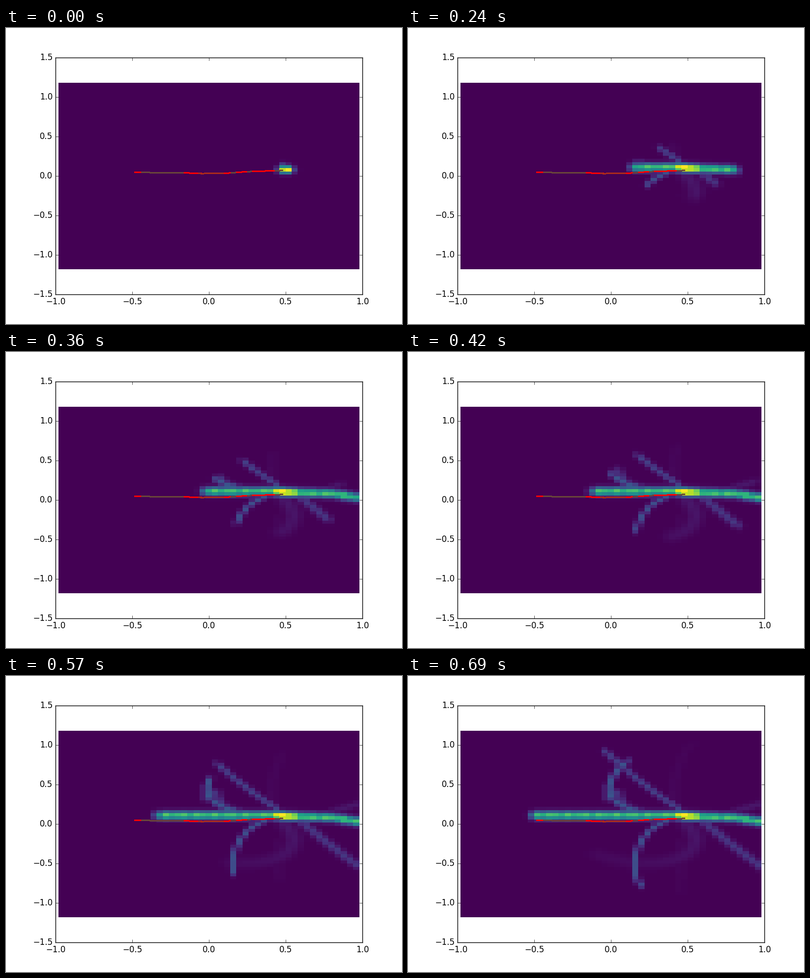
A matplotlib script for the animation above (720 ms loop, 800 px wide and 600 px high).

```python
from math import comb

import numpy as np
import matplotlib.pyplot as plt
from matplotlib.animation import FuncAnimation

plt.style.use("classic")
plt.rcParams["font.family"] = "DejaVu Sans"

FRAMES, INTERVAL = 24, 30
CELL = 0.04
PIXEL_X, PIXEL_Y = 2 / 620, 3 / 480
COLS = np.arange(-24, 25)
ROWS = np.arange(-29, 30)
NN, MM = np.meshgrid(COLS, ROWS)


def smooth(x):
    x = np.clip(x, 0, 1)
    return x * x * (3 - 2 * x)


def bell(d, width):
    return np.exp(-(d / width) ** 2)


# horizontal beam: a ridge that bends down on the right, with slight beats
RIDGE = np.interp(NN, [10, 13, 20, 24], [2.8, 2.5, 2.1, 0.9])
LEVEL = (0.7 + 0.45 * bell(NN - 12.3, 1.8)
         + 0.06 * np.cos(2 * np.pi * (NN + 12.2) / 2.625))
BEAM = LEVEL * bell(MM - RIDGE, 1.27)
BEAM_START = np.where(NN <= 12, (11 - NN) / 1.087, NN - 13.6)

# compact emission spot that fades while the beam builds up
SPOT = 1.18 * bell(NN - 12.55, 1.08) * bell(MM - 2.05, 1.1)


def bezier(points, u):
    k = len(points) - 1
    weights = [comb(k, j) * u ** j * (1 - u) ** (k - j) for j in range(k + 1)]
    return np.array(points, float).T @ np.array(weights)


def stroke(value, width, start, end, points, fade=0.0):
    """Cell weights along a curve, and the frame at which each part appears."""
    u = np.linspace(0, 1, 90)
    n, m = bezier(points, u)[:, :, None, None]
    level = value * (1 - fade * u)[:, None, None]
    kernel = level * bell(NN - n, width) * bell(MM - m, 1.2 * width + 0.25)
    return kernel, start + (end - start) * u


STROKES = [
    # diagonal towards the upper left
    stroke(0.19, 0.55, 2.5, 22.6, [(11, 5), (5, 12.4), (-1, 23.3)]),
    # hook above the beam, with its blur
    stroke(0.26, 0.55, 8, 23, [(4, 4.5), (-1.1, 6.8), (-1.8, 12.9), (3, 20.5)]),
    stroke(0.16, 0.70, 7, 14, [(5, 4), (1.5, 5), (1.2, 10)]),
    stroke(0.07, 0.50, 15, 18, [(-1, 8), (-1, 12)]),
    # hook below the beam
    stroke(0.24, 0.50, 2.5, 22.7, [(9, 1), (4.2, -2.1), (2.6, -14.1), (5, -19.6)]),
    # curve towards the lower right
    stroke(0.16, 0.75, 4, 19, [(15, 1), (19, -5.7), (24.5, -13.5)]),
    # faint wide swirls
    stroke(0.06, 1.40, 3, 23, [(12.5, 0), (17.5, -10.1), (6.9, -16.6), (-3, -9)],
           fade=0.65),
    stroke(0.02, 0.90, 4, 23, [(10.5, 5), (9.5, 18), (13.5, 26)], fade=0.5),
    stroke(0.02, 0.90, 8, 23, [(11.5, -6), (11.3, -22)], fade=0.5),
    # small branch at the right edge
    stroke(0.06, 0.70, 10, 14, [(20, 4), (24, 6.2)]),
]


def density(i):
    heat = np.maximum(BEAM * smooth((i - BEAM_START + 0.2) / 2.4),
                      SPOT * max(0, 1 - i / 4))
    for kernel, t in STROKES:
        seen = smooth((i - t + 0.6) / 1.5)
        heat = np.maximum(heat, (kernel * seen[:, None, None]).max(axis=0))
    return heat


def edges(cells, shift):
    """Cell borders moved by a fraction of a pixel; the outer end stays put."""
    e = (np.append(cells, cells[-1] + 1) - 0.5) * CELL
    e[:-1] -= shift
    return e


fig = plt.figure(figsize=(8, 6), dpi=100, facecolor="white")
ax = fig.add_axes([0.125, 0.1, 0.775, 0.8])
mesh = ax.pcolormesh(edges(COLS, 0.35 * PIXEL_X), edges(ROWS, 0.35 * PIXEL_Y),
                     density(0), cmap="viridis", vmin=0, vmax=1)

LINE_X = [-0.485, -0.17, -0.05, 0.10, 0.25, 0.483]
LINE_Y = [0.045, 0.041, 0.031, 0.033, 0.055, 0.070]


def trace(a, b, color):
    x = np.linspace(a, b, 60)
    ax.plot(x, np.interp(x, LINE_X, LINE_Y), color=color, lw=1.44,
            antialiased=False, solid_capstyle="butt")


trace(-0.485, 0.483, "#ff0000")
trace(-0.07, 0.095, "#aa2a1c")
for a, b in [(-0.44, -0.165), (0.145, 0.175), (0.25, 0.28), (0.43, 0.483)]:
    trace(a, b, "#69463a")

ax.set_xlim(-1, 1)
ax.set_ylim(-1.5, 1.5)
ax.set_xticks(np.arange(-1, 1.1, 0.5))
ax.set_yticks(np.arange(-1.5, 1.6, 0.5))


def update(i):
    mesh.set_array(density(i))
    return [mesh]


anim = FuncAnimation(fig, update, frames=FRAMES, interval=INTERVAL,
                     repeat=True, repeat_delay=0, blit=False)
plt.show()
```
